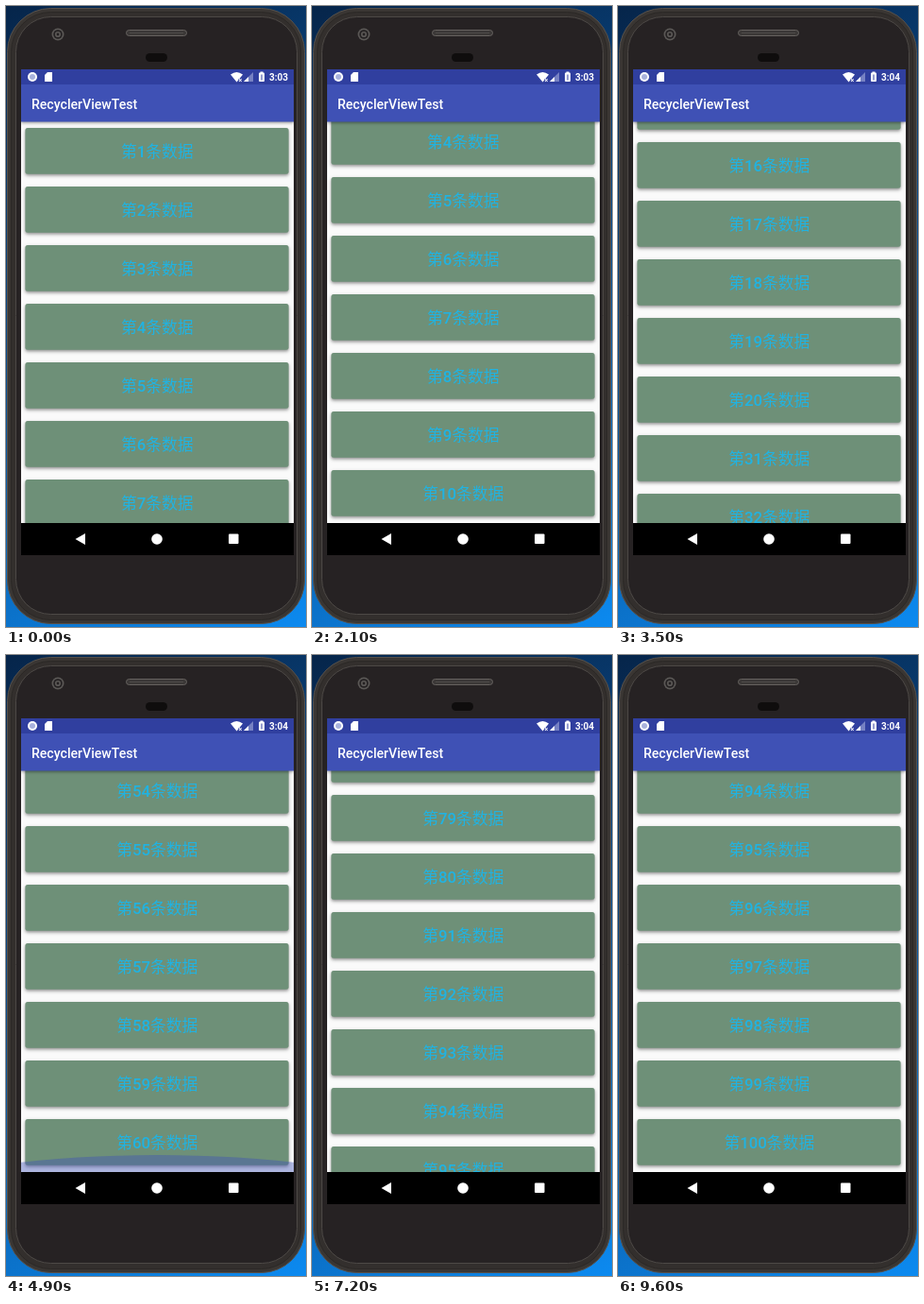
Recreate the animation shown at these times as an HTML page with a canvas. Size 318 by 657 pixels, loop 9.7 s.

```html
<!DOCTYPE html>
<html lang="zh-CN">
<head>
<meta charset="utf-8">
<style>
html, body { margin: 0; width: 100%; height: 100%; overflow: hidden; background: #0a2444; }
canvas { display: block; }
</style>
</head>
<body>
<canvas id="stage" width="318" height="657"></canvas>
<script>
const ctx = document.getElementById('stage').getContext('2d');
const LOOP = 9700, STEP = 100;
const PITCH = 62, PAGE = 10, PAGES = 6, VISIBLE = 424;
const GLOW_TIME = 500;
const FONT = 'Roboto, "Noto Sans CJK SC", "Noto Sans CJK", sans-serif';

// Each swipe runs to the end of the next loaded page; ease is the power of its progress.
const swipes = [
  { start: 1200, steps: 5, ease: 1 },
  { start: 2600, steps: 9, ease: .5 },
  { start: 3500, steps: 3, ease: 1.67 },
  { start: 4700, steps: 3, ease: 1 },
  { start: 6000, steps: 4, ease: 1.94 },
  { start: 7200, steps: 3, ease: .72 }
];
const arrival = swipe => swipe.start + (swipe.steps - 1) * STEP;
const pageEnd = pages => pages ? pages * PAGE * PITCH - VISIBLE : 0;

function scrollAt(t) {
  const page = swipes.filter(s => s.start <= t).length;
  if (!page) return 0;
  const { start, steps, ease } = swipes[page - 1];
  const progress = Math.min(1, ((t - start) / STEP + 1) / steps);
  const from = pageEnd(page - 1);
  return Math.round(from + (pageEnd(page) - from) * progress ** ease);
}

// The first two pages follow on; each later page skips ten numbers.
function numberAt(i) {
  const page = Math.floor(i / PAGE);
  return (page ? 20 * page - 10 : 0) + i % PAGE + 1;
}

function rect(color, x, y, w, h) {
  ctx.fillStyle = color;
  ctx.fillRect(x, y, w, h);
}

function round(color, x, y, w, h, r, stroke) {
  ctx.beginPath();
  ctx.roundRect(x, y, w, h, r);
  ctx.fillStyle = color;
  ctx.fill();
  if (stroke) { ctx.strokeStyle = stroke; ctx.stroke(); }
}

function disc(color, x, y, r) {
  ctx.fillStyle = color;
  ctx.beginPath();
  ctx.arc(x, y, r, 0, 7);
  ctx.fill();
}

function poly(color, ...points) {
  ctx.fillStyle = color;
  ctx.beginPath();
  points.forEach(p => ctx.lineTo(...p));
  ctx.fill();
}

function text(str, x, y, size, color, align = 'left', weight = 400) {
  ctx.font = `${weight} ${size}px ${FONT}`;
  ctx.fillStyle = color;
  ctx.textAlign = align;
  ctx.fillText(str, x, y);
}

function shadow(blur, dy, alpha) {
  ctx.shadowBlur = blur;
  ctx.shadowOffsetY = dy;
  ctx.shadowColor = `rgba(0,0,0,${alpha})`;
}

function drawPhone() {
  const sky = ctx.createLinearGradient(0, 0, 318, 657);
  sky.addColorStop(0, '#06254a');
  sky.addColorStop(.5, '#0a4f92');
  sky.addColorStop(1, '#0c8af0');
  rect(sky, 0, 0, 318, 657);

  round('#3a3633', 1.5, 2.5, 315, 651, 46, '#56514c');
  round('#332f2d', 5.5, 6.5, 307, 643, 42, '#2b2826');
  round('#262223', 10.5, 11.5, 298, 632, 37, '#4d4946');

  ['#5b5856', '#242122', '#5b5856', '#242122']
    .forEach((color, i) => disc(color, 55, 30, 6.5 - i * 1.7));
  round('#3b3837', 127.5, 25.5, 64, 6, 3, '#66625f');
  rect('#4c4947', 131, 28, 57, 1);
  round('#0f0d0d', 148, 50, 23, 9, 4.5);
}

function drawBars(t) {
  shadow(3, 1, .35);
  rect('#3f51b5', 16, 83, 289, 39.5);
  shadow(0, 0, 0);
  rect('#303f9f', 16, 67, 289, 16);
  text('RecyclerViewTest', 27, 109, 14.1, '#fff', 'left', 500);

  disc('#fff', 28, 75, 5);
  disc('#a9b2dc', 28, 75, 3);
  poly('#fff', [44, 70], [49, 70], [49, 80], [41, 80], [41, 73]);

  ctx.fillStyle = '#fff';
  ctx.beginPath();
  ctx.moveTo(244.5, 80.5);
  ctx.lineTo(238, 72.5);
  ctx.quadraticCurveTo(244.5, 67.5, 251, 72.5);
  ctx.fill();
  text('×', 246, 81, 8, '#303f9f', 'left', 700);
  text('×', 246.5, 81, 7, '#fff', 'left', 700);
  poly('#7681c3', [262, 70], [262, 80], [252, 80]);
  poly('#fff', [257, 75], [257, 80], [252, 80]);
  rect('#fff', 269.5, 69.5, 3, 2);
  round('#fff', 268, 70.5, 6, 9.5, 1);
  rect('#303f9f', 270.5, 72.5, 1, 6);
  text(t < 3000 ? '3:03' : '3:04', 299, 79, 10, '#fff', 'right', 700);

  rect('#000', 16, 547, 289, 34);
  poly('#fff', [73.5, 564], [84, 558], [84, 570]);
  disc('#fff', 160, 564, 5.8);
  round('#fff', 236, 558.5, 10.5, 10.5, 1);
}

function drawList(t) {
  const scroll = scrollAt(t);
  const first = Math.max(0, Math.floor(scroll / PITCH) - 1);
  const last = Math.min(PAGES * PAGE, first + 10);
  rect('#fafafa', 16, 122, 289, 425);
  for (let i = first; i < last; i++) {
    const y = 129 + i * PITCH - scroll;
    shadow(3.5, 1.8, .42);
    round('#6e9078', 20.4, y, 279.2, 48.8, 2.5);
    shadow(0, 0, 0);
    text(`第${numberAt(i)}条数据`, 160.3, y + 31, 16.8, '#20b3e2', 'center', 500);
  }
}

// Only swipes still moving fast at the edge make it glow.
function drawGlow(t) {
  const hit = swipes.filter(s => s.ease > .6).map(arrival)
    .find(time => t >= time && t < time + GLOW_TIME);
  if (!hit) return;
  const age = (t - hit) / GLOW_TIME, scale = Math.min(.31 + age, .67);
  ctx.fillStyle = `rgba(63,81,181,${.42 * (1 - age)})`;
  ctx.beginPath();
  ctx.ellipse(160.5, 547 + 375 * scale, 433, 433 * scale, 0, 0, 7);
  ctx.fill();
}

function drawToast(t) {
  const shown = arrival(swipes[PAGES - 1]), gone = 9600;
  if (t < shown || t >= gone) return;
  ctx.globalAlpha = Math.min(1, (t - shown + STEP) / 200, (gone - t) / 400);
  shadow(3, 1, .35);
  round('#e8e8e8', 111, 472, 99, 28, 14);
  shadow(0, 0, 0);
  text('没有更多数据了', 160.5, 489.6, 9.8, '#222', 'center');
  ctx.globalAlpha = 1;
}

function draw(now) {
  const t = Math.floor(now % LOOP / STEP) * STEP;
  drawPhone();
  ctx.save();
  ctx.beginPath();
  ctx.rect(16, 67, 289, 514);
  ctx.clip();
  drawList(t);
  drawGlow(t);
  drawToast(t);
  drawBars(t);
  ctx.restore();
}

const begin = performance.now();
function tick() {
  draw(performance.now() - begin);
  requestAnimationFrame(tick);
}
tick();
</script>
</body>
</html>
```
